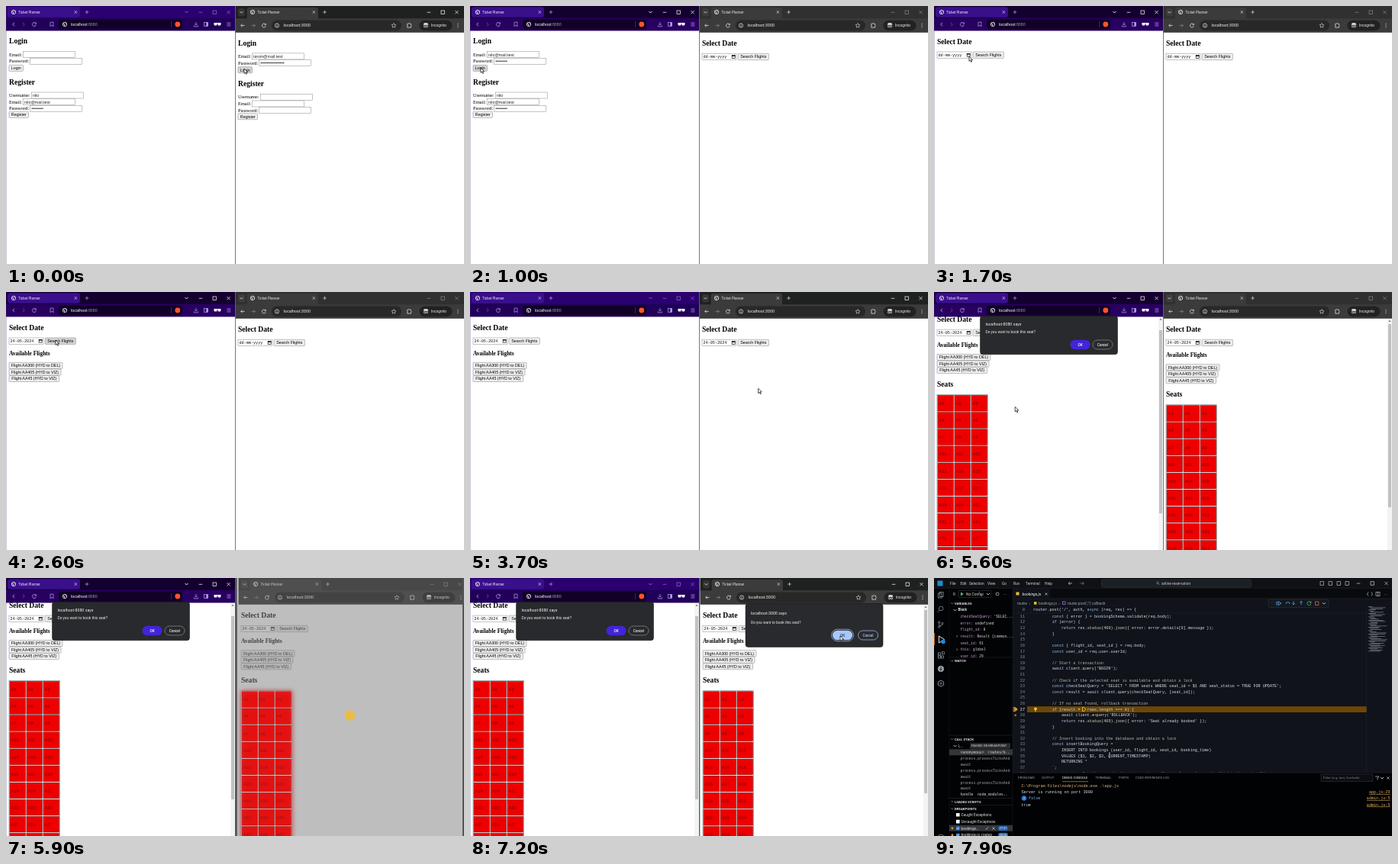
An HTML page for the animation above (8000 ms loop, 600 by 338 pixels).

```html
<!DOCTYPE html>
<html lang="en">
<head>
<meta charset="utf-8">
<title>Two browsers</title>
<style>
html, body { margin: 0; width: 100%; height: 100%; overflow: hidden; background: #fff; }
svg { display: block; width: 100vw; height: 100vh; }
text { white-space: pre; }
</style>
</head>
<body>
<svg id="stage" viewBox="0 0 600 338"></svg>
<script>
const stage = document.getElementById('stage');
const LOOP = 8000, STEP = 100;
const SERIF = "'Liberation Serif',serif", SANS = "'Liberation Sans',sans-serif";
const UI = 'Roboto,sans-serif', MONO = "'Liberation Mono',monospace";
const TITLE = 'Ticket Planner';

let mouse = { x: 0, y: 0 };

// ---------- drawing helpers ----------
const esc = s => s.replace(/&/g, '&amp;').replace(/</g, '&lt;');
const text = (x, y, s, size, fill = '#000', font = UI, more = '') =>
  `<text x="${x}" y="${y}" font-size="${size}" fill="${fill}" font-family="${font}" ${more}>${esc(s)}</text>`;
const rect = (x, y, w, h, fill, more = '') =>
  `<rect x="${x}" y="${y}" width="${w}" height="${h}" fill="${fill}" ${more}/>`;
const line = (d, color, w = .7) =>
  `<path d="${d}" fill="none" stroke="${color}" stroke-width="${w}"/>`;
const dot = (x, y, r, fill, more = '') => `<circle cx="${x}" cy="${y}" r="${r}" fill="${fill}" ${more}/>`;
const ring = (x, y, r, color, w = .7) => dot(x, y, r, 'none', `stroke="${color}" stroke-width="${w}"`);
const box = (x, y, w, h, color, more = '') => rect(x, y, w, h, 'none', `stroke="${color}" stroke-width=".7" ${more}`);
const move = (x, y, s) => `<g transform="translate(${x} ${y})">${s}</g>`;
const MID = 'text-anchor="middle"', BOLD = 'font-weight="700"';

const globe = (x, y) => ring(x, y, 2.7, '#ddd', .9) +
  line(`M${x - 2} ${y - 1}l2 1l-.6 2M${x + .4} ${y - 2.2}l1.6 1.6`, '#ddd', .9);
const cross = (x, y, r, c) => line(`M${x - r} ${y - r}l${2 * r} ${2 * r}m0 ${-2 * r}l${-2 * r} ${2 * r}`, c);
const plus = (x, y, c) => line(`M${x - 2.3} ${y}h4.6M${x} ${y - 2.3}v4.6`, c);
const reload = (x, y, c) => line(`M${x + 2} ${y - 1.4}a2.5 2.5 0 1 0 .4 2M${x + 2.4} ${y - 2.6}v1.8h-1.8`, c, .8);
const arrow = (x, y, dir, c) => line(`M${x + 2.3 * dir} ${y}h${-4.8 * dir}m${4.8 * dir} 0l${-2 * dir} -2m${2 * dir} 2l${-2 * dir} 2`, c, .8);
const chevron = (x, y, c) => line(`M${x - 2} ${y - 1}l2 2l2 -2`, c, .9);
const controls = (x, c) => line(`M${x - 2.3} 8.3h4.6`, c) + box(x + 16, 6, 4.4, 4.4, c) + cross(x + 36.5, 8.2, 2.1, c);

// ---------- page parts ----------
const heading = (y, s, size = 9.6) => text(4, y, s, size, '#000', SERIF, BOLD);
function button(x, y, w, s, ox, oy, h = 8) {
  const mx = mouse.x - ox, my = mouse.y - oy;
  const over = mx > x && mx < x + w && my > y && my < y + h;
  return rect(x, y, w, h, over ? '#d6d6d6' : '#efefef', 'rx=".8" stroke="#808080" stroke-width=".5"') +
    text(x + w / 2, y + h / 2 + 1.9, s, 5.33, '#000', SANS, MID);
}
const field = (label, y, x, value = '', secret = false) =>
  text(4, y, label, 6.4, '#000', SERIF) +
  rect(x, y - 6, 68, 8, '#fff', 'stroke="#8a8a8a" stroke-width=".5"') +
  (secret
    ? [...value].map((_, i) => dot(x + 2.8 + i * 1.95, y - 2, .75, '#000')).join('')
    : text(x + 1.6, y - .1, value, 5.33, '#222', SANS));

const loginPage = (f, ox, oy) =>
  heading(49.3, 'Login') +
  field('Email:', 65.6, 22.5, f.email) + field('Password:', 74.3, 31.5, f.pass, true) +
  button(4, 77.4, 18.5, 'Login', ox, oy) +
  heading(102.6, 'Register') +
  field('Username:', 119, 33.3, f.name) + field('Email:', 127.7, 22.5, f.newEmail) +
  field('Password:', 136.3, 31.5, f.newPass, true) +
  button(4, 138.4, 25.5, 'Register', ox, oy);

function seats() {
  let s = rect(4, 145.5, 66.4, 230, '#e6dada', 'stroke="#666" stroke-width=".5"');
  for (let i = 0; i < 30; i++) {
    const x = 5 + (i % 3) * 22, y = 146.5 + Math.floor(i / 3) * 22.1;
    s += rect(x, y, 20.4, 20.5, '#ee0000', 'stroke="#6b0000" stroke-width=".5"') +
      text(x + 1.8, y + 12.6, 'A' + (i + 1), 5.6, '#7d0000', SANS);
  }
  return s;
}

function calendar() {
  let s = rect(4, 70, 100, 127, '#fff', 'stroke="#aaa" stroke-width=".6" rx="1"') +
    text(9, 81, 'May, 2024', 5.3, '#222', SANS, BOLD) + `<path d="M37 78h4l-2 2.4z" fill="#222"/>` +
    line('M84 81.5v-5m-1.7 1.7l1.7 -1.7l1.7 1.7M96 76.5v5m-1.7 -1.7l1.7 1.7l1.7 -1.7', '#222');
  'Su Mo Tu We Th Fr Sa'.split(' ').forEach((d, i) =>
    s += text(13.7 + i * 13.4, 96, d, 5, '#222', SANS, MID));
  for (let i = 0; i < 42; i++) {
    const x = 13.7 + (i % 7) * 13.4, y = 108 + Math.floor(i / 7) * 13, n = i - 2;
    const day = n < 1 ? n + 30 : n > 31 ? n - 31 : n;
    if (n === 24) s += rect(x - 6, y - 8, 12, 12, '#fff', 'stroke="#1a73e8" stroke-width=".7" rx="1"');
    s += text(x, y, day + '', 5, n === day ? '#222' : '#999', SANS, MID);
  }
  return s + text(9, 192, 'Clear', 5, '#1a73e8', SANS) + text(99, 192, 'Today', 5, '#1a73e8', SANS, 'text-anchor="end"');
}

const datePage = (p, ox, oy) =>
  heading(49.6, 'Select Date') +
  rect(4, 60, 45, 8.3, '#fff', 'stroke="#8a8a8a" stroke-width=".5"') +
  text(5.5, 66, p.date ? '24-05-2024' : 'dd-mm-yyyy', 5.15, '#111', MONO) +
  box(43.2, 62.3, 4, 3.8, '#111') + line('M43 63h4.4', '#111', 1.2) +
  button(51.2, 60, 40.2, 'Search Flights', ox, oy, 8.4) +
  (p.flights
    ? heading(83, 'Available Flights', 7.49) +
      button(4, 92.4, 70, 'Flight AA300 (HYD to DEL)', ox, oy) +
      button(4, 101, 68, 'Flight AA405 (HYD to VIZ)', ox, oy) +
      button(4, 109.5, 65.5, 'Flight AA45 (HYD to VIZ)', ox, oy)
    : '') +
  (p.seats ? heading(134.6, 'Seats') : '');

const scrollbar = (x, top, at) => rect(x, top, 6, 338 - top, '#f3f3f3') +
  `<path d="M${x + 1.4} ${top + 4.2}h3.2l-1.6 -2.2z" fill="#777"/>` + rect(x + 1, at, 4, 240, '#c1c1c1');

function dialog(x, y, h, port, rows, okX, c) {
  const [titleY, bodyY, midY] = rows.map(r => y + r);
  return rect(x, y, 180, h, '#292a2d', 'rx="3.5" stroke="#111" stroke-width=".5"') +
    text(x + 7, titleY, `localhost:${port} says`, 5.3, '#f4f4f4') +
    text(x + 7, bodyY, 'Do you want to book this seat?', 4.82, '#eee') +
    (c.focus ? box(okX - 14.5, midY - 7.8, 29, 15.6, c.edge, 'rx="7.8"') : '') +
    rect(okX - 13, midY - 6.3, 26, 12.6, c.ok, 'rx="6.3"') +
    text(okX, midY + 1.7, 'OK', 4.7, c.okText, UI, MID + ' font-weight="500"') +
    box(x + 147.5, midY - 6, 26, 12, c.edge, 'rx="6"') +
    text(x + 160.5, midY + 1.7, 'Cancel', 4.5, c.cancel, UI, MID + ' font-weight="500"');
}
const PURPLE = { ok: '#4225d8', okText: '#fff', edge: '#8f8f95', cancel: '#eee' };
const BLUE = { ok: '#a8c7fa', okText: '#1a3f78', edge: '#a8c7fa', cancel: '#a8c7fa', focus: true };

// ---------- browser frames ----------
function leftChrome(active) {
  const c = active ? '#fff' : '#8d74bd', i = '#b9a3e6';
  return rect(0, 0, 300, 16.5, active ? '#14002f' : '#2b0170') + rect(0, 15.8, 300, 16.7, active ? '#270060' : '#21005a') +
    rect(2, 1.2, 95, 13.6, '#3a0f8c', 'rx="3"') + globe(10, 8) + text(16, 9.8, TITLE, 4.55, '#eee') +
    cross(91.3, 8, 1.7, '#ddd') + plus(106, 8, i) + chevron(236.5, 8, c) + controls(255, c) +
    line('M11 21.7l-2.2 2.3l2.2 2.3', i, .9) + line('M22 21.7l2.2 2.3l-2.2 2.3', '#6a4a9e', .9) + reload(37, 24, i) +
    line('M58 21.2h4v5.6l-2 -1.6l-2 1.6z', i) + rect(69, 17.8, 162, 12.6, '#110028', 'rx="3"') +
    globe(77, 24) + text(85, 25.9, 'localhost', 5.3, '#fff') + text(106.6, 25.9, ':8080', 5.3, '#9c90b0') +
    line('M216.5 20v8', '#55407a', .6) + dot(224.8, 24, 3.4, '#fb542b') +
    line('M249 21v4m-1.8 -1.6l1.8 1.8l1.8 -1.8M246.4 25.4v1.6h5.2v-1.6', i) +
    box(259.5, 21.6, 5, 4.8, i) + rect(262.3, 21.6, 2.2, 4.8, i) +
    rect(272.5, 22, 4, 3.6, '#fff', 'rx="1.4"') + rect(277.4, 22, 4, 3.6, '#fff', 'rx="1.4"') + rect(272.5, 22, 9, 1, '#fff') +
    line('M289.4 22h5M289.4 24h5M289.4 26h5', i);
}

function rightChrome(active) {
  const c = active ? '#fff' : '#888', g = '#dadada', bar = '#3b3b3b';
  return rect(300.5, 0, 300, 17, active ? '#1f2020' : '#303030') + rect(300.5, 16.3, 300, 18.5, bar) +
    rect(304, 3, 9, 10.5, active ? '#343434' : '#3d3d3d', 'rx="2.5"') + chevron(308.5, 8.2, g) +
    rect(315.5, 2, 93.5, 16, bar, 'rx="3"') + globe(323, 8) + text(329.5, 9.8, TITLE, 4.55, '#e8e8e8') +
    cross(403.3, 8, 1.7, g) + plus(417.5, 8, g) + controls(554, c) +
    arrow(310, 25.5, -1, g) + arrow(324, 25.5, 1, '#858585') + reload(338, 25.5, g) +
    rect(348, 18.6, 170, 13.8, '#282828', 'rx="6.9"') + ring(355, 25.5, 2.6, g, .8) +
    line('M355 25v2M355 23.6v.7', g, .8) + text(363.5, 27.4, 'localhost:3000', 5.4, '#f0f0f0') +
    line('M508 22.5l.9 2l2.1 .2l-1.6 1.4l.5 2.1l-1.9 -1.1l-1.9 1.1l.5 -2.1l-1.6 -1.4l2.1 -.2z', g, .6) +
    line('M525.8 23.3h1.5q.8 -2 1.6 0h1.6v1.6q1.8 .8 0 1.6v1.7h-4.7z', g, .8) +
    rect(541.5, 18.8, 43, 13.4, '#222', 'rx="6.7"') + rect(547.4, 22.3, 5.2, 2.1, '#eee') +
    line('M546.6 24.6h6.8', '#eee') + ring(548.5, 26.8, 1.1, '#eee') + ring(551.5, 26.8, 1.1, '#eee') +
    text(557, 27.2, 'Incognito', 4.8, '#f0f0f0') + dot(592, 23.3, .6, g) + dot(592, 25.5, .6, g) + dot(592, 27.7, .6, g);
}

function leftWindow(t) {
  const p = { date: t >= 2200, flights: t >= 2500, seats: t >= 4900 };
  const form = {
    email: t >= 700 ? 'nilo@mail.test' : '', pass: t >= 800 ? 'x'.repeat(8) : '',
    name: 'nilo', newEmail: 'nilo@mail.test', newPass: 'x'.repeat(8)
  };
  const scroll = t >= 5200 ? -10.9 : 0;
  const body = t < 1100 ? loginPage(form, 0, 0) : datePage(p, 0, scroll) + (p.seats ? seats() : '');
  return rect(0, 0, 300, 338, '#fff') + move(0, scroll, body) +
    (p.seats ? scrollbar(294, 32.5, scroll ? 50 : 40) : '') +
    (t >= 1800 && t < 2200 ? calendar() : '') +
    leftChrome((t >= 600 && t < 2800) || (t >= 4900 && t < 6300)) +
    line('M.2 0V338', '#4b3a70', .4) +
    (t >= 5500 ? dialog(60.5, 31.3, 50.5, 8080, [12.3, 22.6, 37.7], 191.5, PURPLE) : '');
}

function rightWindow(t) {
  const p = { date: t >= 3700, flights: t >= 4100, seats: t >= 4400 };
  const form = { email: 'tarvin@mail.test', pass: 'x'.repeat(16), name: '', newEmail: '', newPass: '' };
  const veil = t >= 5800 && t < 6200;
  const ox = veil ? 4 : t >= 6200 ? 1 : 0, px = 300 + ox, py = 2.3;
  const active = t < 600 || (t >= 2800 && t < 4900) || t >= 6300;
  const page = t < 400 ? loginPage(form, px, py) : datePage(p, px, py);
  return rect(300, 0, 300, 338, '#fff') + move(px, py, page) +
    (p.seats && !veil ? scrollbar(594, 34.8, 42) : '') + move(ox, 0, rightChrome(active)) +
    (veil ? rect(300, 0, 300, 34.8, '#777', 'opacity=".35"') + rect(300, 34.8, 300, 303.2, '#828383', 'opacity=".52"') : '') +
    (p.seats
      ? (veil ? move(px, py, rect(4, 145.5, 67, 230, '#c44', 'filter="url(#soft)"')) : '') +
        `<g opacity="${veil ? .75 : 1}">${move(px, py, seats())}</g>`
      : '') +
    (veil ? dot(450.5, 180, 6.8, '#e9bd45') + rect(598, 0, 2, 338, '#555') : '') +
    (t >= 3300 && t < 3700 ? move(300, 2.2, calendar()) : '') +
    rect(300, 0, .8 + ox * .5, 338, '#55565c') +
    (t >= 7000 && t < 7600 ? dialog(361, 33.5, 57, 3000, [14.6, 26.3, 41.5], 488, BLUE) : '');
}

// ---------- editor ----------
const CODE = [
  [11, 0, 'const { error } = bookingSchema.validate(req.body);'],
  [12, 0, 'if (error) {'],
  [13, 1, 'return res.status(400).json({ error: error.details[0].message });'],
  [14, 0, '}'], [15, 0, ''],
  [16, 0, 'const { flight_id, seat_id } = req.body;'],
  [17, 0, 'const user_id = req.user.userId;'], [18, 0, ''],
  [19, 0, '// Start a transaction'],
  [20, 0, "await client.query('BEGIN');"], [21, 0, ''],
  [22, 0, '// Check if the selected seat is available and obtain a lock'],
  [23, 0, "const checkSeatQuery = 'SELECT * FROM seats WHERE seat_id = $1 AND seat_status = TRUE FOR UPDATE';"],
  [24, 0, 'const result = await client.query(checkSeatQuery, [seat_id]);'], [25, 0, ''],
  [26, 0, '// If no seat found, rollback transaction'],
  [27, 0, 'if (result.', 0, 'rows.length === 0) {', 46],
  [28, 1, 'await client.', 0, "query('ROLLBACK');", 44],
  [29, 1, "return res.status(409).json({ error: 'Seat already booked' });"],
  [30, 0, '}'], [31, 0, ''],
  [32, 0, '// Insert booking into the database and obtain a lock'],
  [33, 0, 'const insertBookingQuery = `'],
  [34, 1, 'INSERT INTO bookings (user_id, flight_id, seat_id, booking_time)', 1],
  [35, 1, 'VALUES ($1, $2, $3, CURRENT_TIMESTAMP)', 1],
  [36, 1, 'RETURNING *', 1], [37, 0, '`;'],
  [38, 0, 'const bookingResult = await client.query(insertBookingQuery, [user_id, flight_id, seat_id]);']
];
const TOKEN = /(\/\/.*)|('[^']*'|`)|\b(const|async)\b|\b(if|return|await)\b|(\w+)(?=\()|\b(\d+)\b|([A-Za-z_]\w*)|([^\w'`]+?)/g;
const STRING = '#dde3e8';
const TINT = ['#b4bab4', STRING, '#9dbfe6', '#bcc9ea', '#e4e4cc', '#cfe0c4', '#cfdeec', '#e0e0e0'];
const CHAR = 3.07;
const code = (x, y, s, quoted) => {
  const spans = quoted ? `<tspan fill="${STRING}">${esc(s)}</tspan>` : s.replace(TOKEN, (m, ...g) =>
    `<tspan fill="${TINT[g.slice(0, 8).findIndex(v => v !== undefined)]}">${esc(m)}</tspan>`);
  return `<text x="${x}" y="${y}" font-size="5.12" font-family="${MONO}">${spans}</text>`;
};

function activityBar() {
  const c = '#9aa0a8';
  return box(5.5, 20, 4.6, 6, c) + box(7.5, 18.4, 4.6, 6, c) +
    ring(9.3, 40, 2.8, c) + line('M7.3 42l-2.6 2.8', c) +
    ring(6.8, 58, 1.2, c) + ring(6.8, 64, 1.2, c) + ring(11, 59.5, 1.2, c) + line('M6.8 59.2v3.6M11 60.7q0 2 -4 2', c) +
    line('M6.5 76l7 4.5l-7 4.5z', '#fff', .9) + dot(12, 83.5, 2.8, '#2188e0') + rect(0, 72, 1, 16, '#c9702a') +
    box(5.5, 98, 3, 3, c) + box(5.5, 102, 3, 3, c) + box(9.6, 102, 3, 3, c) + box(10.4, 96.8, 3, 3, c) +
    dot(9, 119, 4, c) + line('M9.8 116.5l-2 3h2.4l-2 2.6', '#000') +
    line('M9 134.2l3.6 2v4l-3.6 2l-3.6 -2v-4z', c, .9) + ring(9, 138.2, 1.2, c) + ring(9, 340, 4, c);
}

function sidebar() {
  const head = (y, s, open = true) => text(27, y + 1.6, s, 4.3, '#e4e4e4', UI, BOLD) +
    line(open ? `M22.3 ${y - .6}l1.4 1.4l1.4 -1.4` : `M23 ${y - 1.4}l1.4 1.4l-1.4 1.4`, '#ccc', .6);
  let s = rect(0, 14, 103, 324, '#020305') + line('M20 14V338M103 14V338', '#1b1e24', .5) + activityBar() +
    text(25, 22.6, 'R.', 4.6, '#ccc') + box(32, 16.5, 43, 9, '#2a2e35', 'rx="1"') +
    `<path d="M35 18.5l4 2.5l-4 2.5z" fill="#4fb86b"/>` + text(42, 22.7, 'No Configi', 4.9, '#ddd') +
    chevron(71, 21, '#ccc') + ring(83, 21, 2, '#ccc') + text(91, 21.8, '...', 5, '#ccc') +
    head(33, 'VARIABLES') + text(31.5, 43.3, 'Block', 4.5, '#eee', UI, BOLD) + chevron(27.5, 42, '#ccc');
  [['checkSeatQuery', " 'SELEC..."], ['error', ' undefined'], ['flight_id', ' 8'], ['result', ' Result {commun...'],
    ['seat_id', ' 61'], ['this', ' global'], ['user_id', ' 29']].forEach(([k, v], i) => {
    const y = 51.8 + i * 8.7;
    s += `<text x="34.5" y="${y}" font-size="4.6" font-family="${MONO}"><tspan fill="#d0a0dc">${k}:</tspan><tspan fill="#dde2e6">${v}</tspan></text>`;
    if (i === 3 || i === 5) s += line(`M29.5 ${y - 3}l1.4 1.4l-1.4 1.4`, '#ccc', .6);
  });
  s += rect(20.3, 104, 82.4, 9, '#020305') + line('M20 104h83M20 206h83M20 288.5h83M20 297.5h83', '#2a2d33', .5) +
    head(108.5, 'WATCH') + head(211, 'CALL STACK') + text(32, 221.6, 'L...', 4.6, '#ddd') + chevron(27.5, 220, '#ccc') +
    rect(47, 216.2, 53, 7.6, '#2b2c2e', 'rx="1"') + text(49, 221.4, 'PAUSED ON BREAKPOINT', 4, '#ddd') +
    rect(20, 224.3, 83, 8, '#33363b');
  const tick = 'process.processTicksAnd';
  ['<anonymous>  routes/b..', tick, 'await', tick, 'await', tick, 'await', 'handle  node_modules..'].forEach((v, i) =>
    s += text(34.5, 230 + i * 7.9, v, 4.7, i % 7 ? '#a8adb3' : '#e4e4e4', MONO));
  s += head(293, 'LOADED SCRIPTS', false) + head(302, 'BREAKPOINTS') + rect(20, 323.7, 83, 8, '#33363b');
  ['Caught Exceptions', 'Uncaught Exceptions', 'bookings...', 'bookings.js  routes'].forEach((v, i) => {
    const y = 310.3 + i * 8.8, on = i > 1;
    s += rect(29, y - 2.3, 4.6, 4.6, on ? '#2188e0' : '#fff', 'rx=".5"') + text(35.5, y + 1.7, v, 4.8, '#e4e4e4');
    if (on) s += line(`M30 ${y}l1 1.2l1.8 -2.2`, '#fff', .6) + dot(24, y, 1.4, '#e0912f') +
      rect(84, y - 3, 13, 6, '#2764b5', 'rx="3"') + text(90.5, y + 1.5, i === 2 ? '27:21' : '28:20', 4, '#fff', UI, MID);
  });
  return s + line('M68 329.5l3 -3', '#ccc', 1) + cross(78, 328, 1.7, '#ccc');
}

function panel() {
  let s = rect(103, 254.7, 497, 83.3, '#010204') + line('M103 255h497', '#2a2d33', .6);
  [[110, 'PROBLEMS'], [141, 'OUTPUT'], [168, 'DEBUG CONSOLE'], [211.5, 'TERMINAL'], [242, 'PORTS'], [264, 'CODE REFERENCE LOG']]
    .forEach(([x, v], i) => s += text(x, 263.4, v, 4.25, i === 2 ? '#fff' : '#9a9fa6'));
  s += line('M168 266.7h34', '#c9702a', .8) + rect(507, 257, 68, 9.5, '#0b0d12', 'stroke="#3a3f47" stroke-width=".5"') +
    text(510, 263.4, 'Filter (e.g. text, !exclude)', 4.4, '#888') + line('M578 260h5l-2 2v2.5', '#ccc') +
    chevron(587, 262, '#ccc') + cross(595, 262, 1.6, '#ccc');
  const ink = ['#e3bd7c', '#dcdfe2', '#7fb2ee', '#dcdfe2'];
  ['C:\\Program Files\\nodejs\\node.exe .\\app.js', 'Server is running on port 3000', '   false', 'true'].forEach((v, i) =>
    s += text(114.5, 274 + i * 8.2, v, 5.2, ink[i], MONO));
  s += dot(118, 288.6, 3.3, '#2a6fcf') + text(118, 290, '2', 3.8, '#fff', UI, MID);
  ['app.js:29', 'admin.js:5', 'admin.js:5'].forEach((v, i) =>
    s += text(597.5, 282.2 + i * 8.2, v, 5.12, '#e8b45c', MONO, 'text-anchor="end" text-decoration="underline"'));
  return s;
}

function titleBar() {
  let s = rect(0, 0, 600, 14, '#0f1115') + line('M0 14h600', '#2a2d33', .5) + rect(4.5, 3.5, 7, 7, '#2489ca');
  [[21, 'File'], [34.5, 'Edit'], [46, 'Selection'], [70, 'View'], [89, 'Go'], [104, 'Run'], [120, 'Terminal'], [145, 'Help']]
    .forEach(([x, v]) => s += text(x, 8.7, v, 4.8, '#d4d4d4'));
  return s + arrow(178.5, 7, -1, '#bbb') + arrow(194, 7, 1, '#777') +
    rect(219.5, 2, 196, 10, '#1b1f26', 'rx="2" stroke="#3a3f47" stroke-width=".5"') +
    text(317, 8.8, 'airline-reservation', 4.8, '#ccc', UI, MID) +
    ring(293, 6.4, 1.3, '#bbb', .5) + line('M294 7.5l1.4 1.4', '#bbb', .6) +
    [506, 517, 528, 539].map(x => box(x, 4.7, 4.6, 4.6, '#bbb')).join('') + move(0, -1.2, controls(556, '#ccc'));
}

function editor() {
  const yellow = '#e5c22f';
  let s = rect(0, 0, 600, 338, '#10131a') + titleBar() + rect(103, 14, 497, 13, '#080a0e') + line('M103 27h497', '#2a2d33', .5) +
    rect(103, 14, 49, 13, '#10131a') +
    rect(107.5, 18.5, 4, 4, yellow) + text(115.5, 22.7, 'bookings.js', 5, '#fff', UI, 'font-style="italic"') + cross(147, 21, 1.5, '#ccc') +
    box(579, 18.5, 5, 5, '#bbb') + line('M581.5 18.5v5M569 18.5l-1.5 2.5l1.5 2.5M573 18.5l1.5 2.5l-1.5 2.5', '#bbb') + text(590, 21.8, '...', 5, '#ccc') +
    text(109, 34.6, 'routes  ›', 4.7, '#a0a5ab') + rect(131, 31.2, 3.5, 3.5, yellow) +
    text(137, 34.6, 'bookings.js  ›', 4.7, '#a0a5ab') + box(168.5, 31, 3.6, 3.6, '#b180d7') +
    text(175, 34.6, "router.post('/') callback", 4.85, '#a0a5ab') +
    text(119, 43, '8', 5.12, '#8d939b', MONO, 'text-anchor="end"') + code(130, 43, "router.post('/', auth, async (req, res) => {") +
    line('M103 46h463', '#23272e', .5) + rect(122, 168.2, 445, 7.8, '#6b4708');
  for (const [n, indent, v, quoted, rest, gap] of CODE) {
    const y = 51.8 + (n - 11) * 7.62, x = 154.7 + indent * 12.3;
    s += text(119, y, n + '', 5.12, n === 27 ? '#fff' : '#8d939b', MONO, 'text-anchor="end"') + code(x, y, v, quoted);
    if (rest) s += dot(x + v.length * CHAR + 1.6, y - 1.8, 1.3, '#e0912f') + code(x + gap, y, rest);
  }
  s += line('M194.5 169.5h2l2.5 2.5l-2.5 2.5h-2z', yellow, .9) +
    dot(106.7, 172, 2, '#e0912f') + line('M104 169.5h2.5l2.8 2.5l-2.8 2.5h-2.5z', yellow, .8) + dot(106.7, 179.8, 1.4, '#d0632d') +
    dot(133, 171.2, 1.8, '#ffcc33') + rect(132.2, 172.6, 1.6, 2, '#ffcc33') +
    rect(438, 28, 79, 10.5, '#14181e', 'rx="2" stroke="#33383f" stroke-width=".5"') +
    text(441, 34.4, '⋮⋮', 4, '#888') +
    line('M449 30.7v5M451 30.7l4 2.5l-4 2.5zM461 34a2.5 2.5 0 0 1 5 0M471 30.5v4.5m-1.6 -1.6l1.6 1.6l1.6 -1.6M481 35v-4.5m-1.6 1.6l1.6 -1.6l1.6 1.6', '#4fa3f0', .9) +
    reload(491.5, 33.2, '#5cc26f') + box(499.5, 31, 4.4, 4.4, '#e8703a') + chevron(511, 33.2, '#ccc');
  for (let i = 0; i < 40; i++) {
    const r = Math.abs((Math.sin(i * 12.99) * 43758.5) % 1);
    s += rect(569 + (i % 3) * 1.5, 37 + i * 1.5, 5 + r * 18, .7, '#aab4c0', 'opacity=".7"');
  }
  return s + line('M566.7 37V255', '#23272e', .5) + panel() + sidebar();
}

// ---------- timeline ----------
const PATH = [
  [0, 312, 82], [400, 312, 82], [600, 50, 64], [800, 50, 73], [1000, 14, 81], [1300, 14, 81], [1600, 46, 66],
  [1800, 46, 66], [2100, 81, 145], [2400, 65, 63], [2700, 65, 63], [3100, 344, 67], [3300, 344, 67], [3600, 381, 147],
  [3900, 368, 67], [4100, 368, 67], [4300, 340, 114], [4400, 340, 114], [4700, 45, 111], [4900, 45, 111],
  [5300, 38, 146], [5500, 38, 146], [5800, 301, 163], [6300, 320, 163], [6700, 317, 160], [6900, 317, 160],
  [7200, 485, 76], [7500, 485, 76], [7800, 230, 232], [8000, 230, 232]
];
function mouseAt(t) {
  const i = PATH.findIndex(p => p[0] > t), [t0, x0, y0] = PATH[i - 1], [t1, x1, y1] = PATH[i];
  const k = (t - t0) / (t1 - t0), e = k * k * (3 - 2 * k);
  return { x: x0 + (x1 - x0) * e, y: y0 + (y1 - y0) * e };
}
const pointer = () => move(mouse.x, mouse.y,
  '<path d="M0 0v6.3l1.5 -1.3l1.1 2.4l1.1 -.5l-1.1 -2.3h2z" fill="#fff" stroke="#000" stroke-width=".7"/>');
const beam = () => line(`M${mouse.x - 1} ${mouse.y - 3}h2m-1 0v6m-1 0h2`, '#ddd', .6);

function draw(t) {
  mouse = mouseAt(t);
  const busy = t >= 5800 && t < 6200;
  stage.innerHTML = '<filter id="soft"><feGaussianBlur stdDeviation="3"/></filter>' +
    (t >= 7600 ? editor() + beam() : rightWindow(t) + leftWindow(t) + (busy ? '' : pointer()));
}

let shown = -1;
const start = performance.now();
function tick() {
  const t = Math.floor(((performance.now() - start) % LOOP) / STEP) * STEP;
  if (t !== shown) draw(shown = t);
  requestAnimationFrame(tick);
}
tick();
</script>
</body>
</html>
```
